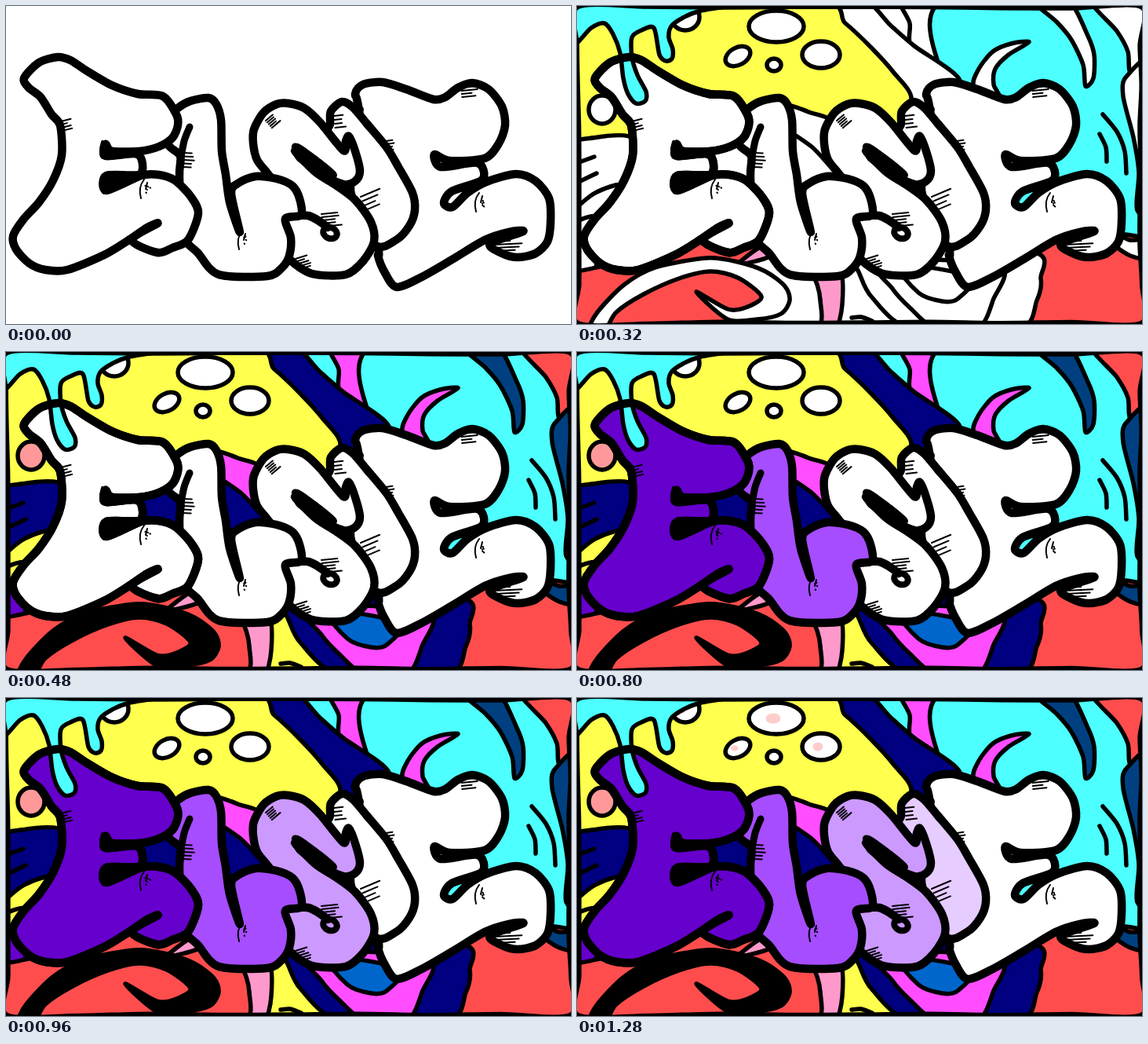
Animation of 720x405 px, one loop 1.44 s. Source, as an HTML page with a canvas:

```html
<!DOCTYPE html>
<html>
<head>
<meta charset="utf-8">
<style>
html, body { margin: 0; width: 100%; height: 100%; overflow: hidden; background: #fff }
canvas { display: block }
</style>
</head>
<body>
<canvas id="stage" width="720" height="405"></canvas>
<script>
const W = 720, H = 405, STEP = 160, STEPS = 9;
const ctx = document.getElementById('stage').getContext('2d');
const CYAN = '#4dffff', YELLOW = '#ffff4d', RED = '#ff4d4d', NAVY = '#000080',
  MAGENTA = '#ff4dff', PINK = '#ff99cc', DEEP = '#004080', PURPLE = '#6600cc', WHITE = '#fff';

let seed = 7;
const random = () => (seed = seed * 16807 % 2147483647) / 2147483647;

// Smooth path through key points
function spline(p, closed) {
  const n = p.length, path = new Path2D();
  const at = i => closed ? p[(i + n) % n] : p[Math.max(0, Math.min(n - 1, i))];
  path.moveTo(...p[0]);
  for (let i = 0; i < (closed ? n : n - 1); i++) {
    const [a, b, c, d] = [at(i - 1), at(i), at(i + 1), at(i + 2)];
    path.bezierCurveTo(b[0] + (c[0] - a[0]) / 7, b[1] + (c[1] - a[1]) / 7,
      c[0] - (d[0] - b[0]) / 7, c[1] - (d[1] - b[1]) / 7, ...c);
  }
  if (closed) path.closePath();
  return path;
}
const points = text => text.split(' ').map(s => s.split(',').map(Number));
const line = text => spline(points(text));
const shape = text => spline(points(text), true);
function ellipse(x, y, rx, ry, turn = 0) {
  const path = new Path2D();
  path.ellipse(x, y, rx, ry, turn, 0, 7);
  return path;
}

// Back to front: [first coloured step, colour, outline]; white before that step.
// Edges that should not show run under a later layer.
const scenery = [
  [3, CYAN, '360,-9 420,-9 440,80 360,80'],
  [3, MAGENTA, '413,-9 424,22 424,48 440,100 469,100 470,-9'],
  [2, CYAN, '470,-9 469,100 560,300 735,320 735,-9'],
  [3, MAGENTA, '506,102 512,80 530,58 553,48 576,46 550,62 533,80 531,100 538,116'],
  [3, DEEP, '580,-9 612,21 630,43 645,75 648,102 658,92 659,62 651,38 625,-9'],
  [3, RED, '656,-9 688,32 702,58 706,86 735,90 735,-9'],
  [3, DEEP, '735,76 700,90 696,115 709,167 716,212 714,260 740,262'],
  [3, NAVY, '300,-9 364,-9 400,25 430,51 488,95 450,130 420,130'],
  [2, YELLOW, '-9,-9 300,-9 342,22 375,53 403,84 426,118 400,160 320,148 295,135 275,132 200,150 68,169 20,168 -9,182'],
  [3, NAVY, '150,180 215,170 280,163 336,215 300,240 150,225'],
  [3, MAGENTA, '260,125 295,135 330,152 340,218 300,180 260,150'],
  [3, NAVY, '-9,182 20,168 72,169 72,226 50,228 20,240 -9,266'],
  [3, YELLOW, '-9,266 20,240 52,228 60,240 24,268 -9,280'],
  [3, YELLOW, '-9,280 24,268 22,302 -9,304'],
  [3, PURPLE, '-9,304 14,304 24,333 -9,347'],
  [2, RED, '540,300 735,300 735,414 540,414'],
  [3, DEEP, '680,285 704,298 735,297 735,322 705,318 680,300'],
  [3, YELLOW, '320,330 420,330 430,414 325,414'],
  [2, PINK, '290,335 334,335 338,380 328,414 298,414 310,375'],
  [3, NAVY, '340,315 357,335 375,370 428,412 562,412 586,375 591,347 575,312'],
  [3, MAGENTA, '385,325 402,360 425,385 458,412 510,412 530,375 537,330'],
  [3, '#0066cc', '412,330 435,365 465,376 485,373 502,345'],
  [3, RED, '206,328 245,316 296,338 310,375 300,414 185,414'],
  [2, RED, '-9,347 20,334 60,325 160,290 236,306 206,329 250,350 262,380 230,398 185,414 -9,414'],
  [2, PINK, '206,329 236,306 248,318'],
  [3, '#000', '16,412 26,390 60,355 100,333 165,321 205,326 240,338 265,357 271,375 260,392 230,399 192,399 152,364 192,386 215,384 235,370 205,346 170,338 130,347 85,367 50,390 36,412']
].map(([step, color, text]) => [step, color, shape(text)]);
scenery.push([3, '#ff9999', ellipse(32, 132, 17, 18)]);

const craters = [[254, 26, 35, 20], [205, 64, 17, 11, -0.5], [251, 75, 9, 8], [311, 62, 24, 17], [138, 14, 18, 17]];
for (const c of craters) scenery.push([1, WHITE, ellipse(...c)]);
const spots = craters.filter(c => c[2] > 10)
  .map(([x, y, rx, ry]) => ellipse(x - 4, y, rx * 0.27, ry * 0.33));

const drip = shape('-9,52 18,28 35,22 46,36 55,60 59,92 65,112 75,124 87,121 88,109 77,88 70,65 70,40 82,31 98,28 105,62 113,70 121,67 122,55 117,40 120,26 135,15 158,6 230,-9 -9,-9');
const whiskers = ['0,200 22,192', '0,225 25,213', '350,397 362,396 376,401',
  '670,138 688,160 698,185 700,213', '666,163 674,180 675,198'].map(line);

// Letters overlap from right to left, so the last one lies on top
const letters = [
  [STEPS, WHITE, '450,134 445,112 455,100 480,97 510,106 545,119 560,116 576,104 594,98 615,106 632,128 636,152 628,175 610,194 565,197 546,189 554,205 601,200 607,221 568,236 558,251 569,256 588,238 612,224 650,214 675,223 692,245 694,275 690,300 675,315 652,320 632,315 617,303 659,287 640,288 610,298 570,322 530,345 498,358 483,340 474,318 474,303'],
  [7, '#e6ccff', '413,150 414,134 428,122 442,129 460,150 485,180 500,205 518,238 521,260 514,280 497,298 470,304 440,240 440,200 410,165'],
  [6, '#cc99ff', '334,214 320,196 315,175 316,157 328,136 345,125 360,124 380,130 400,148 430,184 433,172 437,166 445,185 451,210 445,223 430,227 395,211 368,185 395,212 420,228 445,247 465,275 469,300 455,325 433,342 390,341 362,323 350,300 354,272 385,267 410,282 385,267 350,265 345,230'],
  [5, '#a64dff', '221,217 222,191 207,177 200,150 219,130 235,121 258,117 268,125 274,145 275,185 280,215 285,250 298,288 287,238 297,225 318,217 345,220 365,229 374,245 376,266 356,271 363,295 361,318 352,333 333,344 271,342 245,315 225,290'],
  [4, PURPLE, '66,65 42,72 23,92 29,104 44,116 58,138 69,152 71,190 60,222 42,250 22,272 9,293 13,310 30,328 50,336 78,336 125,317 158,297 180,282 193,277 160,298 193,314 212,308 232,298 245,264 235,242 215,222 195,215 172,216 128,235 128,216 171,214 168,189 127,191 127,176 135,185 170,185 195,179 212,168 219,152 217,138 200,115 168,112 135,101 102,82 82,69']
].map(([step, color, text]) => [step, color, shape(text)]);
const frontLetter = letters[4][2];

const wedges = ['122,171 135,180 168,181 172,190 123,195', '124,213 135,219 175,212 178,218 125,240',
  '364,178 376,177 420,211 414,221 390,210 370,196'].map(shape);
const innerLine = line('234,154 227,172 222,198');
const loop = ellipse(413, 289, 9, 7, 0.4);
const knot = ellipse(449, 132, 7, 6);

// Ink marks: rows of parallel dashes, then bent ticks with loose dots
const ink = new Path2D();
const addDash = (x, y, dx, dy) => { ink.moveTo(x, y); ink.lineTo(x + dx, y + dy); };
function addHatch(x, y, angle, length, count, gap) {
  const dx = Math.cos(angle), dy = Math.sin(angle);
  for (let i = 0; i < count; i++) {
    const size = length * (1 - random() * 0.5);
    addDash(x - dy * gap * i, y + dx * gap * i, dx * size, dy * size);
  }
}
function addTicks(x, y) {
  ink.moveTo(x + 4, y - 12);
  ink.quadraticCurveTo(x - 4, y - 2, x, y + 12);
  addDash(x + 8, y - 8, -2, 8);
  for (let i = 0; i < 5; i++) addDash(x + 5 + random() * 7, y - 10 + random() * 16, 0.5, 0.5);
}
[
  [70, 147, -0.25, 13, 4, 4], [226, 187, 0.05, 17, 5, 4.5], [331, 146, -0.7, 16, 5, 3],
  [418, 140, -0.1, 14, 4, 5], [484, 172, -0.15, 13, 4, 4], [452, 243, -0.4, 28, 4, 6],
  [402, 265, -0.1, 30, 5, 4], [369, 322, -0.3, 18, 5, 3.5], [580, 104, -0.1, 24, 4, 4],
  [622, 296, -0.05, 36, 5, 4]
].forEach(row => addHatch(...row));
[[172, 233], [297, 298], [599, 250]].forEach(spot => addTicks(...spot));

// Rough frame: straight edges with a small wobble
const corners = [[0, 0], [W, 0], [W, H], [0, H]], rim = [];
corners.forEach(([x, y], k) => {
  const [nx, ny] = corners[(k + 1) % 4];
  for (let i = 0; i < 8; i++) {
    const t = i / 8, wobble = i ? random() * 3 - 1.5 : 0;
    rim.push([x + (nx - x) * t + (k % 2) * wobble, y + (ny - y) * t + (1 - k % 2) * wobble]);
  }
});
const frame = spline(rim, true);

function fill(path, color) {
  ctx.fillStyle = color;
  ctx.fill(path);
}
function stroke(path, width) {
  ctx.lineWidth = width;
  ctx.stroke(path);
}

function draw(step) {
  const layer = ([first, color, path], width) => {
    fill(path, step >= first ? color : WHITE);
    stroke(path, width);
  };
  ctx.fillStyle = WHITE;
  ctx.fillRect(0, 0, W, H);
  ctx.strokeStyle = '#000';
  ctx.lineCap = ctx.lineJoin = 'round';

  if (step >= 1) {
    scenery.forEach(s => layer(s, 5.5));
    whiskers.forEach(w => stroke(w, 5.5));
    if (step >= 8) spots.forEach(s => fill(s, '#ffcccc'));
  }
  letters.forEach(l => layer(l, 10.5));
  if (step >= 1) {
    layer([2, CYAN, drip], 5.5);
    stroke(frontLetter, 10.5);
  }
  wedges.forEach(w => fill(w, '#000'));
  fill(knot, '#000');
  stroke(innerLine, 9);
  stroke(loop, 8);
  stroke(ink, 2);
  if (step >= 2) stroke(frame, 9);
}

function tick() {
  draw(Math.floor(performance.now() / STEP) % STEPS);
  requestAnimationFrame(tick);
}
tick();
</script>
</body>
</html>
```
